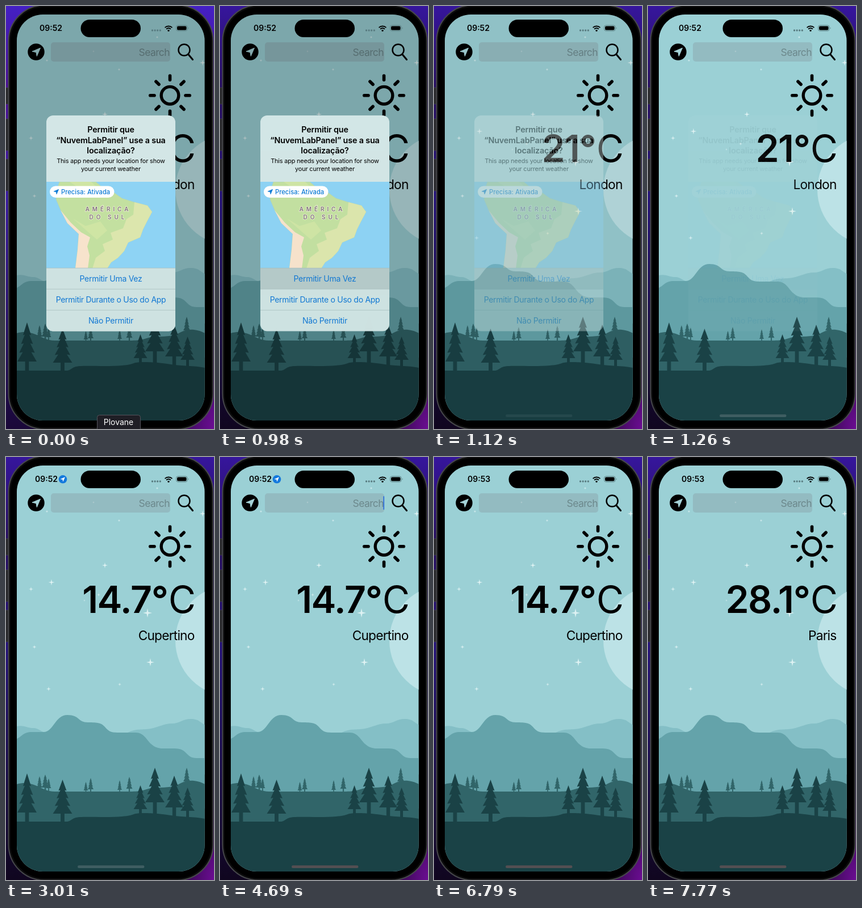
These frames come from a looping animation (366x746 px, 8 s). An HTML page:

```html
<!DOCTYPE html>
<html lang="pt">
<head>
<meta charset="utf-8">
<title>Weather</title>
<style>
  html, body { margin: 0; width: 100%; height: 100%; overflow: hidden; background: #000; }
  svg { display: block; width: 366px; height: 746px; font-family: Inter, "Open Sans", sans-serif; }
  .end { text-anchor: end; }
  .mid { text-anchor: middle; }
  .clock { font-size: 14px; font-weight: 600; }
  .field { font-size: 17.5px; letter-spacing: -.035em; }
  .temp { font-size: 66px; font-weight: 600; letter-spacing: -1.5px; }
  .city { font-size: 22.7px; letter-spacing: -.035em; }
  .title { font-size: 14.3px; font-weight: 600; letter-spacing: -.01em; }
  .note { font-size: 10.9px; letter-spacing: -.015em; }
  .action { font-size: 14px; letter-spacing: -.02em; fill: #1278d3; }
  .region { font-size: 10px; font-weight: 500; letter-spacing: 5px; fill: #79647f;
            stroke: #e6edcb; stroke-width: 2px; paint-order: stroke; }
  .badge { font-size: 11.2px; font-weight: 500; fill: #0d7bd6; }
</style>
</head>
<body>
<svg viewBox="0 0 366 746">
  <defs>
    <linearGradient id="wallA" x2="0" y2="1">
      <stop stop-color="#4420c4"/><stop offset=".2" stop-color="#4a0f92"/>
      <stop offset=".45" stop-color="#3a1aa4"/><stop offset="1" stop-color="#1a0838"/>
    </linearGradient>
    <linearGradient id="wallB" x2="0" y2="1">
      <stop stop-color="#36169c"/><stop offset=".2" stop-color="#260d5e"/>
      <stop offset=".45" stop-color="#25127a"/><stop offset="1" stop-color="#10061f"/>
    </linearGradient>
    <radialGradient id="glow" cx="1" cy="1" r=".25">
      <stop stop-color="#6b0d92"/><stop offset="1" stop-color="#6b0d92" stop-opacity="0"/>
    </radialGradient>
    <clipPath id="screen"><rect x="19" y="15" width="330.5" height="716" rx="46"/></clipPath>
    <clipPath id="card"><rect x="71" y="193" width="227" height="380.5" rx="12"/></clipPath>
    <clipPath id="mapBox"><rect x="71" y="310" width="227" height="152"/></clipPath>
    <path id="arrow" d="M7 -7L-7.5 -.8L-.6 .6L.8 7.5Z" stroke-width="1" stroke-linejoin="round"/>
  </defs>

  <rect id="wall" width="366" height="746" fill="url(#wallA)"/>
  <rect width="366" height="746" fill="url(#glow)"/>
  <g fill="#29292c" stroke="#4a4a4e" stroke-width=".6">
    <rect x="-2" y="144" width="7" height="29"/>
    <rect x="-2" y="199" width="7" height="56"/>
    <rect x="-2" y="270" width="7" height="56"/>
  </g>
  <rect x="4.5" y="-1.5" width="360" height="748" rx="63" fill="#0c0c0d" stroke="#47484b" stroke-width="2"/>
  <rect x="8" y="2" width="353" height="741" rx="60"/>

  <g clip-path="url(#screen)">
    <rect x="19" y="15" width="331" height="716" fill="#9bd0d5"/>
    <circle cx="396" cy="324" r="98" fill="#bce2e6"/>
    <path id="stars" fill="#def2f3"/>
    <path fill="#84bfc6" d="M19 475C30 472 38 478 48 478S62 486 72 486H214C230 478 240 482 255 479S278 470 292 470S310 462 325 462S342 469 350 472V560H19Z"/>
    <path fill="#64a3aa" d="M19 497C28 493 30 485 46 485H66C84 485 86 455 108 455C130 455 126 468 144 468S168 469 174 476S184 486 196 486H228C250 486 248 514 276 514H296C322 514 314 531 336 531H350V620H19Z"/>
    <g fill="#316569">
      <path d="M19 577C34 573 44 576 54 580S72 590 86 590H222C246 590 248 583 266 583S296 582 308 575S338 570 350 577V660H19Z"/>
      <path id="farTrees"/>
    </g>
    <g fill="#1a4246">
      <path d="M19 643H106C116 643 114 636 130 635S180 636 204 634S222 628 240 628S270 629 290 632S330 634 350 638V732H19Z"/>
      <path id="nearTrees"/>
    </g>

    <g transform="translate(53 81)">
      <circle r="14.7"/><use href="#arrow" x=".5" fill="#a5d3d8" stroke="#a5d3d8"/>
    </g>
    <rect x="79" y="64" width="210" height="34" rx="5" fill="#787880" fill-opacity=".24"/>
    <text id="query" class="field end" x="288" y="87.5"></text>
    <rect id="caret" x="287.3" y="69" width="1.8" height="24" rx=".9" fill="#2f6fdc"/>
    <g fill="none" stroke="#000" stroke-width="2.5" stroke-linecap="round">
      <circle cx="313.5" cy="77.5" r="10"/><path d="M321 85.500L328.500 94.500" stroke-width="3"/>
    </g>

    <g transform="translate(288.500 157.700)" fill="none" stroke="#000" stroke-linecap="round">
      <circle r="15.300" stroke-width="5.400"/>
      <path id="rays" stroke-width="5.600"/>
    </g>
    <text id="temp" class="temp end" x="255.500" y="275"></text>
    <text class="temp mid" x="270" y="275">°</text>
    <text class="end" x="334" y="275" font-size="66" font-weight="400">C</text>
    <text id="city" class="city end" x="331.500" y="323"></text>

    <rect id="dim" x="19" y="15" width="331" height="716"/>
    <rect id="home" x="126" y="720.300" width="117.500" height="4.800" rx="2.400"/>

    <g id="dialog" clip-path="url(#card)">
      <rect x="71" y="193" width="227" height="381" fill="#d3e6e6"/>
      <rect x="71" y="462" width="227" height="112" fill="#cee2e1"/>
      <g class="title mid">
        <text x="184.500" y="223">Permitir que</text>
        <text x="184.500" y="242">“NuvemLabPanel” use a sua</text>
        <text x="184.500" y="260">localização?</text>
      </g>
      <g class="note mid">
        <text x="184.500" y="277">This app needs your location for show</text>
        <text x="184.500" y="290.500">your current weather</text>
      </g>
      <g clip-path="url(#mapBox)">
        <rect x="71" y="310" width="227" height="152" fill="#8ed3f4"/>
        <path fill="#c3e0a0" stroke="#a9d3c4" stroke-width=".8" d="M94 310L90 322L88 341L96 360L108 383L128 402L126 430L122 463H178L185 452L197 444L208 432L215 417L236 408L241 394L248 380L257 363L249 352L226 346L204 339L190 329L172 322L158 310Z"/>
        <path fill="#dce6ad" d="M226 346L249 352L257 363L248 380L241 394L236 408L215 417L208 432L197 444L185 452L178 463H152L158 444L174 432L170 420L188 412L184 400L206 392L212 376L224 368Z"/>
        <path fill="#cfe5a4" d="M112 310L130 322L158 318L150 310ZM118 375L140 388L166 380L178 396L160 412L146 400Z"/>
        <path fill="#f7e3cc" d="M96 360L108 383L128 402L126 430L122 463H144L147 440L143 424L148 408L132 399L114 382Z"/>
      </g>
      <g class="region mid">
        <text x="180" y="362">AMÉRICA</text>
        <text x="180" y="376">DO SUL</text>
      </g>
      <rect x="77" y="317.500" width="113.500" height="20.500" rx="10.250" fill="#fff"/>
      <use href="#arrow" transform="translate(88.500 327.500) scale(.6)" fill="#0d7bd6" stroke="#0d7bd6"/>
      <text class="badge" x="97" y="331.500">Precisa: Ativada</text>
      <rect id="pressed" x="71" y="462" width="227" height="37" fill="#53686a" fill-opacity=".2"/>
      <path d="M71 462.200H298M71 499.300H298M71 536.400H298" stroke="#a5bcbc" stroke-width=".7"/>
      <g class="action mid">
        <text x="184.500" y="486">Permitir Uma Vez</text>
        <text x="184.500" y="523">Permitir Durante o Uso do App</text>
        <text x="184.500" y="560">Não Permitir</text>
      </g>
    </g>

    <text id="clock" class="clock" y="44"></text>
    <g id="locating">
      <circle r="7.300" fill="#1379dd"/>
      <use href="#arrow" transform="scale(.5)" fill="#fff" stroke="#fff"/>
    </g>
    <rect x="131.500" y="24" width="105.500" height="31" rx="15.500"/>
    <path d="M257.500 43H272" stroke="#587b80" stroke-width="3.300" stroke-linecap="round" stroke-dasharray="0 4.600"/>
    <path id="wifi" fill="none" stroke="#000" stroke-width="2"/>
    <circle cx="286" cy="43.300" r="1.600"/>
    <rect x="299.500" y="34" width="19.500" height="10" rx="3.200" fill="none" stroke="#5f8589"/>
    <rect x="301" y="35.500" width="16.500" height="7" rx="2"/>
    <path d="M320.500 37.500Q322.500 39 320.500 40.500Z" fill="#5f8589"/>
  </g>

  <g id="tooltip">
    <rect x="160.500" y="721.500" width="76" height="30" rx="4" fill="#1f1e25" stroke="#55545c"/>
    <text class="mid" x="198" y="739" font-size="14" fill="#fff">Plovane</text>
  </g>
</svg>
<script>
const LOOP = 8000;
const el = Object.fromEntries([...document.querySelectorAll('[id]')].map(n => [n.id, n]));
const set = (node, attrs) => { for (const k in attrs) node.setAttribute(k, attrs[k]); };

// Linear interpolation through [time, value] steps.
function ramp(t, steps) {
  let [t0, v0] = steps[0];
  for (const [t1, v1] of steps) {
    if (t < t1) return t1 > t0 ? v0 + (v1 - v0) * (t - t0) / (t1 - t0) : v1;
    [t0, v0] = [t1, v1];
  }
  return v0;
}
// Last value whose time has been reached.
const hold = (t, steps) => steps.filter(s => s[0] <= t).pop()[1];

const polar = (r, a) => `${(r * Math.cos(a)).toFixed(2)} ${(r * Math.sin(a)).toFixed(2)}`;

function star([x, y, r]) {
  const k = r * .18;
  return `M${x} ${y - r}L${x + k} ${y - k}L${x + r} ${y}L${x + k} ${y + k}` +
         `L${x} ${y + r}L${x - k} ${y + k}L${x - r} ${y}L${x - k} ${y - k}Z`;
}

function tree([x, top, height, width, trunk]) {
  const right = [], left = [];
  for (let i = 1; i <= 4; i++) {
    const y = top + height * (.1 + .225 * i);
    const outer = width * (.11 + .0975 * i);
    const inner = i < 4 ? outer * .55 : width * .1;
    right.push(`${x + outer} ${y}`, `${x + inner} ${y - (i < 4 ? 1 : 0)}`);
    left.unshift(`${x - inner} ${y - (i < 4 ? 1 : 0)}`, `${x - outer} ${y}`);
  }
  const foot = top + height + trunk;
  return `M${x} ${top}L${right.join('L')}L${x + width * .1} ${foot}L${x - width * .1} ${foot}L${left.join('L')}Z`;
}

const draw = (node, shape, list) => set(node, { d: list.map(shape).join('') });

draw(el.stars, star, [
  [80, 221, 5.5], [174, 191, 5], [44, 233, 4], [163, 243, 3], [138, 253, 2], [249, 275, 8],
  [254, 362, 7], [50, 335, 3.5], [75, 409, 4], [200, 401, 3], [346, 100, 5.5],
  [199, 112, 2.5], [154, 80, 2], [266, 55, 2.5], [72, 96, 2.5]
]);
draw(el.farTrees, tree, [
  [59, 563, 20, 10, 5], [69, 560, 23, 13, 5], [75, 567, 17, 9, 5], [140.500, 573, 15, 8, 4],
  [149, 566, 20, 10, 5], [200, 570, 17, 8, 5], [217, 564, 21, 11, 6], [318, 548, 24, 12, 6]
]);
draw(el.nearTrees, tree, [
  [37, 558, 69, 34, 18], [99.500, 569, 60, 34, 18], [262, 548, 61, 34, 22],
  [296, 562, 56, 32, 18], [236.500, 579, 42, 24, 14], [319.500, 583, 41, 25, 18]
]);
draw(el.rays, (_, i) => {
  const a = i * Math.PI / 4;
  return `M${polar(27.5, a)}L${polar(34.7, a)}`;
}, Array(8).fill(0));
draw(el.wifi, r => {
  const d = r * Math.SQRT1_2;
  return `M${286 - d} ${44.5 - d}A${r} ${r} 0 0 1 ${286 + d} ${44.5 - d}`;
}, [5.4, 9]);

const steps = {
  tooltip: [[0, 1], [70, .9], [490, 0]],
  dialog: [[980, 1], [1050, .72], [1120, .38], [1190, .15], [1260, .05], [1330, 0]],
  dim: [[980, .2], [1050, .14], [1120, .07], [1190, .025], [1260, 0]],
  clockX: [[980, 59], [1120, 58], [1190, 56.3], [1260, 54], [1400, 51.6], [1540, 51],
           [5110, 51], [5250, 52.5], [5390, 56], [5530, 58.4], [5670, 59]],
  locating: [[1260, 0], [1610, 1], [5110, 1], [5390, 0]],
  caret: [[4689, 0], [4690, 1], [6160, 1], [6370, 0]],
  home: [[1050, 0], [1260, 1]],
  placeholder: [[6510, .45], [6580, .5], [6790, 1]]
};
const values = {
  wall: [[0, 'url(#wallA)'], [980, 'url(#wallB)']],
  home: [[0, '#3f5e62'], [4550, '#544f52']],
  clock: [[0, '09:52'], [5110, '09:53']],
  temp: [[0, '21'], [3010, '14.7'], [7770, '28.1']],
  city: [[0, 'London'], [3010, 'Cupertino'], [7770, 'Paris']],
  query: [[0, ''], [5110, 'P'], [5250, 'Pa'], [5390, 'Par'], [5530, 'Pari'], [5670, 'Paris'], [6580, '']]
};

function render(t) {
  for (const id of ['tooltip', 'dialog', 'dim', 'locating', 'caret', 'home'])
    set(el[id], { opacity: ramp(t, steps[id]) });
  for (const id of ['clock', 'temp', 'city']) el[id].textContent = hold(t, values[id]);
  for (const id of ['wall', 'home']) set(el[id], { fill: hold(t, values[id]) });

  const x = ramp(t, steps.clockX);
  set(el.clock, { x });
  set(el.locating, { transform: `translate(${x + 49} 39.300) scale(${.5 + .5 * ramp(t, steps.locating)})` });
  set(el.pressed, { opacity: t >= 980 ? 1 : 0 });

  const typed = hold(t, values.query);
  el.query.textContent = typed || 'Search';
  set(el.query, {
    fill: typed ? '#000' : '#6c888c',
    opacity: typed || t < 6580 ? 1 : ramp(t, steps.placeholder)
  });
}

const start = performance.now();
function tick() {
  render((performance.now() - start) % LOOP);
  requestAnimationFrame(tick);
}
tick();
</script>
</body>
</html>
```
